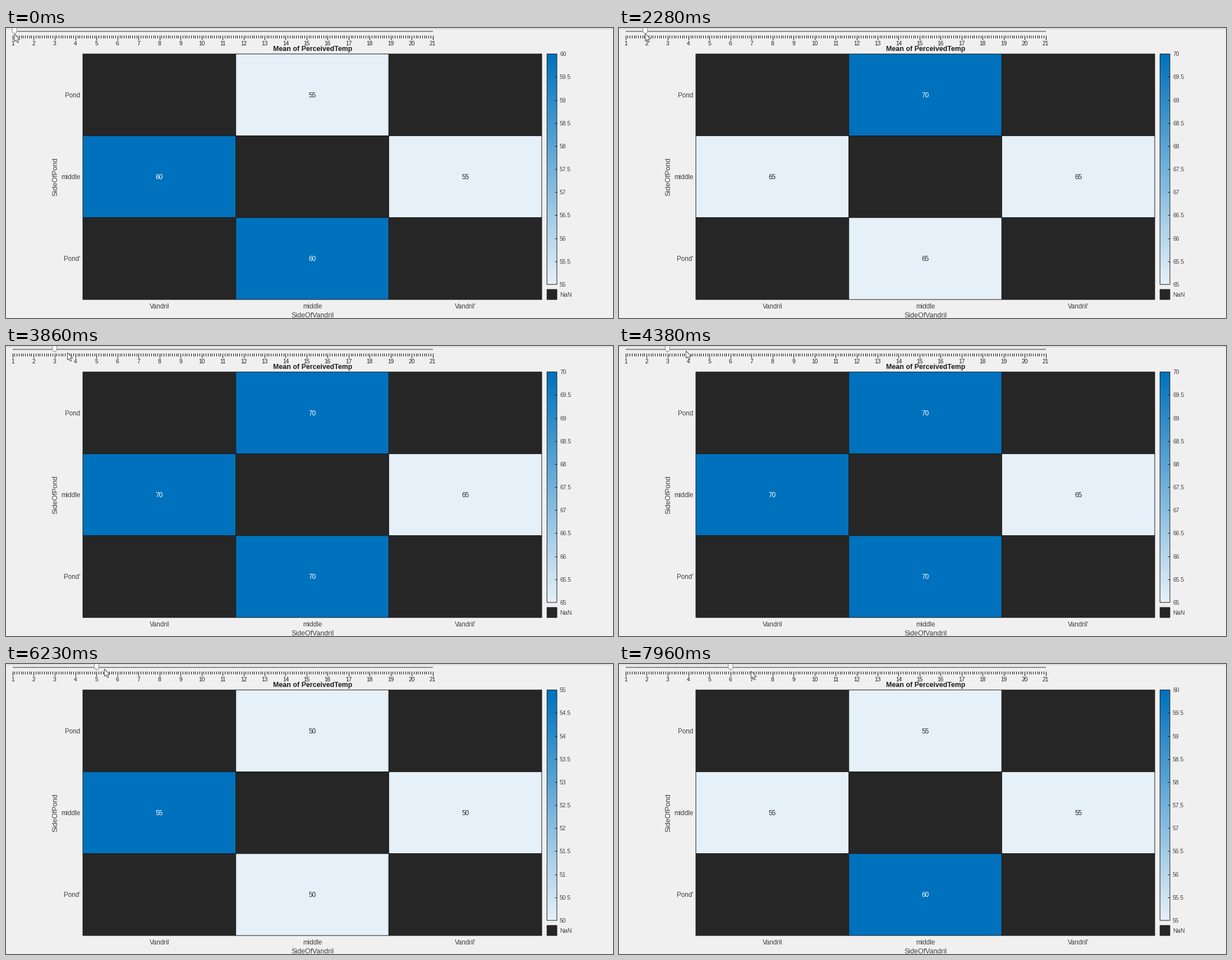
Animation of 1082x518 px, one loop 8 s. Source, as a matplotlib script:

```python
import math

import matplotlib.pyplot as plt
import numpy as np
from matplotlib.animation import FuncAnimation
from matplotlib.collections import LineCollection
from matplotlib.patches import Polygon, Rectangle

W, H, DPI = 1082, 518, 100
FRAMES, INTERVAL = 200, 40
STEP, GLIDE = 130, 650          # ms per pointer update, ms per pointer move
PX = 72 / DPI                   # points per pixel

LIGHT, BLUE = np.array([229, 240, 248]) / 255, np.array([0, 114, 189]) / 255
DARK, INK, EDGE = "#262626", "#404040", "#1c1c1c"
SITE = "Vandril"

X_EDGES, Y_EDGES = np.linspace(137, 955, 4), np.linspace(46.3, 485, 4)
X_MID, Y_MID = ((e[:-1] + e[1:]) / 2 for e in (X_EDGES, Y_EDGES))
CELLS = {"top": (0, 1), "left": (1, 0), "right": (1, 2), "bottom": (2, 1)}
BAR_LEFT, BAR_RIGHT, BAR_TOP, BAR_BOTTOM = 964.3, 982, 46.3, 458
SLIDER_X, SLIDER_STEP = 11.6, 37.45

# One row per slider stop: press time, release time, lowest reading, hot cells
STOPS = [
    (0, 540, 65, "top"),
    (1870, 2400, 65, "top bottom"),
    (3450, 3730, 65, "top left bottom"),
    (4510, 5050, 65, "right"),
    (5700, 6230, 50, "left"),
    (7150, 7570, 55, "bottom"),
]
START = (55, "left bottom")

# Pointer stops: arrival time, x, y
PATH = [(0, 15.2, 11), (400, 24.5, 13.5), (1870, 46.8, 10), (3320, 88, 10),
        (3860, 109.5, 12), (4510, 125, 7), (5050, 155.5, 11), (5700, 163, 4),
        (6230, 175.5, 9), (6750, 201, 12.5), (7960, 235.5, 13)]

POINTER = np.array([(0, 0), (0, 13), (3, 10.4), (5.2, 15.3),
                    (7.4, 14.3), (5.3, 9.6), (9.4, 9.6)])
THUMB = np.array([(-4, -2), (4, -2), (4, 7), (0, 11), (-4, 7)])

fig = plt.figure(figsize=(W / DPI, H / DPI), dpi=DPI, facecolor="#f0f0f0")
ax = fig.add_axes([0, 0, 1, 1])


def label(x, y, text, size, color=INK, ha="center", **kw):
    return ax.text(x, y, text, fontsize=size * PX, color=color, ha=ha,
                   va=kw.pop("va", "baseline"), family="Liberation Sans", **kw)


def box(x0, y0, x1, y1, face, z=2):
    return ax.add_patch(Rectangle((x0, y0), x1 - x0, y1 - y0, facecolor=face,
                                  edgecolor=EDGE, linewidth=PX, zorder=z,
                                  snap=False))


def lines(segments, color, width, z=3):
    ax.add_collection(LineCollection(segments, colors=color,
                                     linewidths=width * PX, zorder=z))


def draw_slider():
    lines([[(0, 0.5), (W, 0.5)], [(W - 0.5, 0), (W - 0.5, H)]], "#cdcdcd", 1)
    lines([[(12, 6), (761, 6)]], "#8f8f8f", 2.2)
    ticks = []
    for i in range(201):
        x = SLIDER_X + SLIDER_STEP * i / 10
        major = i % 10 == 0
        ticks.append([(x, 13), (x, 21 if major else 17.5)])
        if major:
            label(x, 31, str(i // 10 + 1), 10.2, "#202020")
    lines(ticks, "#161616", 1.1)


def draw_heatmap():
    grid = {(r, c): box(X_EDGES[c], Y_EDGES[r], X_EDGES[c + 1], Y_EDGES[r + 1], DARK)
            for r in range(3) for c in range(3)}
    for y, name in zip(Y_MID, ("Pond", "middle", "Pond'")):
        label(132.5, y + 4.2, name, 11.6, ha="right")
    for x, name in zip(X_MID, (SITE, "middle", SITE + "'")):
        label(x, 501, name, 11.6)
    label(546.5, 41.5, "Mean of PerceivedTemp", 12.4, "#1c1c1c", weight="bold")
    label(546.5, 517, "SideOf" + SITE, 12.4)
    label(88, 265.7, "SideOfPond", 12.7, rotation=90, va="center")
    return {name: (grid[r, c], label(X_MID[c], Y_MID[r] + 4.2, "", 11.8, zorder=5))
            for name, (r, c) in CELLS.items()}


def draw_colorbar():
    mix = np.linspace(0, 1, 64)[:, None, None]
    ax.imshow(BLUE * (1 - mix) + LIGHT * mix, aspect="auto",
              extent=(BAR_LEFT, BAR_RIGHT, BAR_BOTTOM, BAR_TOP),
              interpolation="nearest", zorder=2)
    box(BAR_LEFT, BAR_TOP, BAR_RIGHT, BAR_BOTTOM, "none", z=4)
    box(BAR_LEFT, 467, BAR_RIGHT, 485, DARK)
    label(987, 480.5, "NaN", 10.8, ha="left")
    ys = np.linspace(BAR_TOP, BAR_BOTTOM, 11)
    lines([[(BAR_RIGHT - 4, y), (BAR_RIGHT, y)] for y in ys[1:-1]], EDGE, 1)
    return [label(987, y + 3.9, "", 10.4, ha="left") for y in ys]


def pointer_at(t):
    """Rest at each stop, then speed up towards the next in coarse steps."""
    here = PATH[0]
    for there in PATH[1:]:
        arrival = there[0]
        if t < arrival:
            left = math.ceil((arrival - t) / STEP) * STEP
            span = min(GLIDE, arrival - here[0])
            p = max(0, 1 - left / span) ** 2
            return (1 - p) * np.array(here[1:]) + p * np.array(there[1:])
        here = there
    return np.array(here[1:])


def state_at(t):
    """Thumb follows the press, then snaps and loads readings on release."""
    low, hot = START
    for k, (press, release, stop_low, stop_hot) in enumerate(STOPS):
        if t >= release:
            thumb_x = SLIDER_X + SLIDER_STEP * k
            low, hot = stop_low, stop_hot
        elif t >= press:
            thumb_x = pointer_at(press)[0]
    return thumb_x, low, hot.split()


draw_slider()
cells = draw_heatmap()
scale = draw_colorbar()
thumb = ax.add_patch(Polygon(THUMB, facecolor="#fbfbfb", edgecolor="#8a8a8a",
                             linewidth=PX, zorder=6))
pointer = ax.add_patch(Polygon(POINTER, facecolor="white", edgecolor="#4a4a4a",
                               linewidth=PX, zorder=7))
ax.set_xlim(0, W)
ax.set_ylim(H, 0)
ax.axis("off")


def update(i):
    t = (i + 1) * INTERVAL - 1
    thumb_x, low, hot = state_at(t)
    for name, (cell, text) in cells.items():
        is_hot = name in hot
        cell.set_facecolor(BLUE if is_hot else LIGHT)
        text.set_text(str(low + 5 * is_hot))
        text.set_color("white" if is_hot else DARK)
    for k, text in enumerate(scale):
        text.set_text(f"{low + 5 - k / 2:g}")
    thumb.set_xy(THUMB + [thumb_x, 0])
    pointer.set_xy(POINTER + pointer_at(t))
    return []


anim = FuncAnimation(fig, update, frames=FRAMES, interval=INTERVAL,
                     init_func=lambda: [], repeat=True, repeat_delay=0)
plt.show()
```
